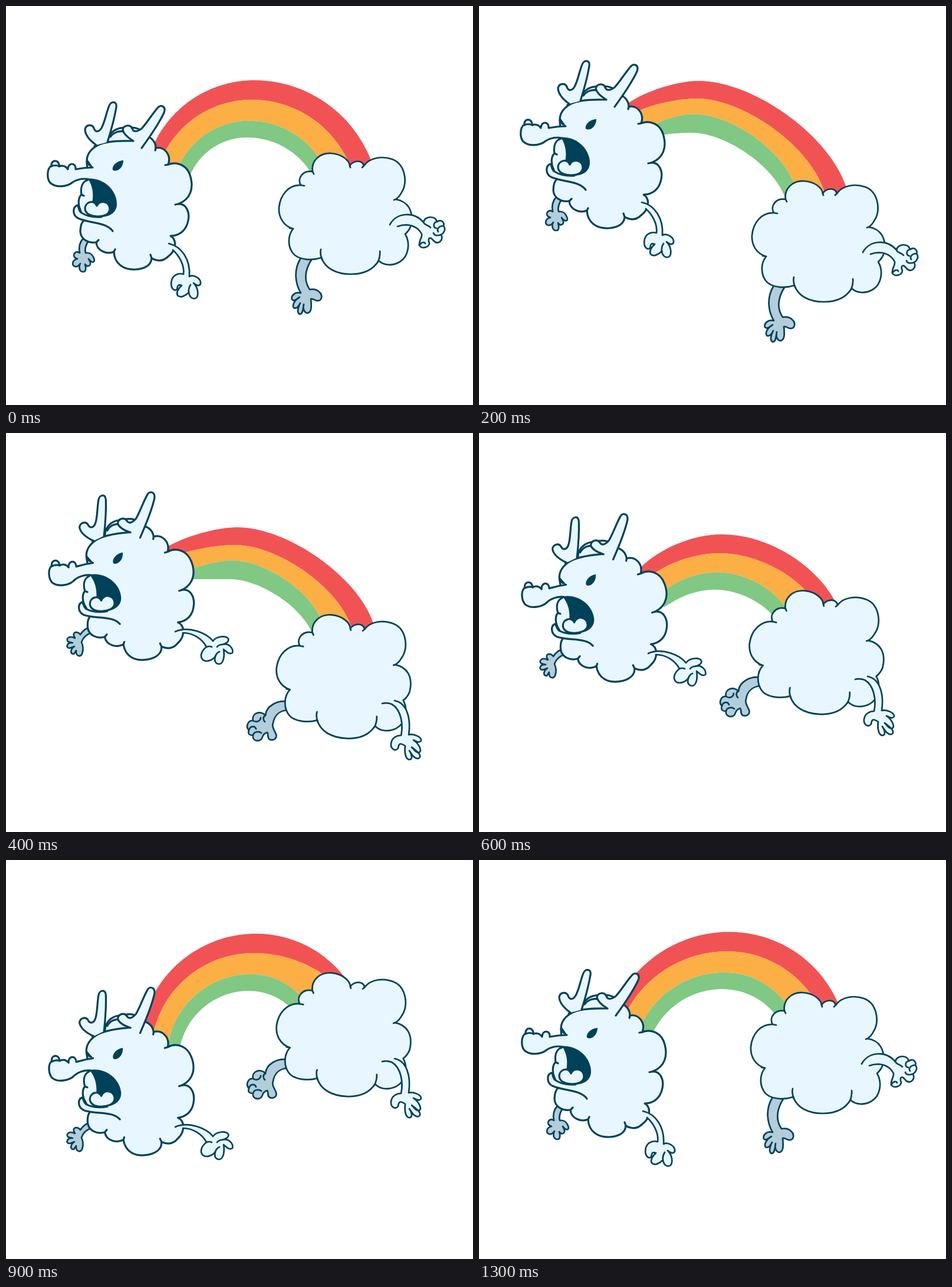
Animation of 792x677 px, one loop 1.4 s. Source, as an HTML page:

```html
<!DOCTYPE html>
<html lang="en">
<head>
<meta charset="utf-8">
<title>Rainbow cloud dragon</title>
<style>
  html, body { margin: 0; width: 100%; height: 100%; overflow: hidden; background: #fff; }
  svg { display: block; width: 100vw; height: 100vh; }
  .ink { fill: none; stroke: #00415a; stroke-width: 2.7; stroke-linecap: round; stroke-linejoin: round; }
  .thick { stroke-width: 3.2; }
  .light { fill: #e8f7ff; }
  .shade { fill: #b4cddb; }
  .dark { fill: #00415a; stroke: none; }
</style>
</head>
<body>
<svg viewBox="0 0 792 677" xmlns="http://www.w3.org/2000/svg">
  <defs>
    <g id="rearCloud">
      <path class="light" d="M500,304 C493,292 504,278 520,281 C517,263 532,249 551,250 C570,251 582,262 583,271 C590,261 604,261 607,271 C617,257 638,254 655,260 C677,268 682,300 671,316 Q667,324 661,328 C680,331 692,346 687,372 Q684,381 677,387 C686,402 683,425 668,434 C656,441 641,441 632,432 C622,449 604,455 585,455 C560,455 541,445 535,427 C517,433 495,430 487,420 C478,409 477,390 487,378 C470,373 462,358 463,342 C465,320 480,303 500,304 Z"/>
      <path d="M534,413 Q532,420 536,430 M634,416 Q635,425 631,434 M487,378 l-6,-1 M520,281 l2,4 M583,271 l1,3 M607,271 l-3,3 M661,328 l-3,1 M500,304 l6,1"/>
    </g>
    <g id="face">
      <path class="light" d="M137,265 C136,248 150,235 172,231 C174,212 190,205 205,207 C220,204 232,210 236,220 C246,222 254,230 254,241 C268,238 281,252 275,269 C290,263 308,270 313,290 C318,308 314,328 292,336 C306,335 312,350 309,364 C306,380 295,390 279,390 C290,396 289,415 275,425 Q263,437 247,428 C246,440 235,446 220,447 C200,448 184,438 183,417 C172,422 154,416 153,401 C140,403 127,396 126,383 Q126,368 133,363 L126,346 C122,338 122,325 128,320 C126,308 129,298 139,295 Z"/>
      <path d="M150,238 C163,231 185,228 215,229 M177,222 C183,213 194,211 204,214 M292,336 l-5,1 M275,269 l-5,1 M254,241 l-1,4 M247,428 l-2,-6 M183,417 l2,-4 M153,401 l4,-4 M128,320 l4,2"/>
      <path class="dark" d="M139,293 C165,291 188,312 188,336 C188,351 175,358 160,358 C147,358 145,345 146,335 C149,318 147,306 139,293 Z"/>
      <path class="light" d="M134,343 C135,332 149,328 154,339 C159,328 176,331 176,345 C175,355 165,357 155,357 C145,357 134,353 134,343 Z"/>
      <path class="light" d="M181,382 C170,366 140,369 122,360 C112,354 113,341 121,338 C124,340 122,347 128,351 C138,357 150,359 162,358"/>
      <path class="light" d="M147,274 C138,274 128,275 118,277 C119,265 105,265 105,277 C101,271 96,270 90,272 C91,260 76,260 77,271 C69,276 69,293 75,300 C85,309 104,307 113,299 C121,294 130,292 141,294"/>
      <path d="M77,272 Q83,269 91,272"/>
      <path class="dark" d="M199,262 C189,262 179,271 181,278 C186,283 199,276 199,262 Z"/>
      <path class="dark" d="M138,260 L147,273 C140,274 136,268 138,260 Z"/>
    </g>
    <path id="antlerLeft" class="light" d="M153,236 C142,228 134,218 134,209 C136,201 146,200 149,207 C151,214 157,215 162,207 C168,196 170,181 175,169 C178,161 189,161 187,172 C184,190 178,212 172,231"/>
    <path id="antlerRight" class="light" d="M216,229 C206,223 199,216 198,210 C200,201 211,201 214,208 C216,214 222,214 230,208 C240,197 248,183 257,173 C262,166 272,170 268,181 C261,196 246,219 230,241"/>
  </defs>

  <g id="rainbow"></g>

  <g id="rear">
    <g class="ink">
      <path class="shade" d="M499,429 C488,448 490,470 500,487 C490,484 483,492 485,498 C488,502 494,497 498,494 C489,499 485,508 488,512 C493,515 497,508 499,504 C495,512 493,520 498,523 C504,523 504,512 505,506 C503,514 506,521 512,521 C519,519 518,508 517,497 C522,496 524,501 530,500 C536,499 537,490 532,486 C528,481 521,480 515,481 C506,468 505,450 519,429"/>
      <use href="#rearCloud"/>
      <path class="light" d="M651,371 C662,350 692,348 708,367 C710,356 728,355 731,366 C739,361 744,368 742,373 C747,379 742,386 738,388 C742,396 735,405 727,400 L721,394 C716,392 716,398 718,402 C718,410 704,413 701,406 C700,399 706,393 705,387 C698,373 682,368 664,374"/>
      <path d="M708,367 C710,372 717,372 720,376 M731,366 C724,367 724,377 730,377 M742,373 C734,373 730,379 733,383 M738,388 C732,390 726,390 725,385 M701,406 C705,400 710,400 711,403"/>
    </g>
    <g class="ink">
      <g transform="translate(0 40)">
        <path class="shade" d="M480,357 C458,353 441,366 440,380 C432,371 416,376 419,389 C410,388 406,400 412,405 C409,413 415,414 419,414 C417,424 431,426 434,419 C436,414 437,411 443,409 C446,412 442,417 447,421 C456,424 461,417 457,410 C453,402 451,398 453,393 C455,381 463,372 478,371"/>
        <path d="M419,389 C425,393 431,390 432,384 M440,380 C435,383 436,388 439,391 M412,405 C414,398 422,397 424,403 M419,414 C420,408 428,406 433,410"/>
      </g>
      <use href="#rearCloud" transform="translate(567 352) rotate(2.7) scale(1.015) translate(-570 -350)"/>
      <path class="light" transform="translate(0 40)" d="M659,355 C680,359 687,385 683,413 C690,411 705,416 704,423 C700,428 696,424 691,422 C700,428 706,440 701,443 C695,444 692,438 688,434 C699,442 706,449 700,453 C693,455 688,446 684,440 C690,449 689,456 683,455 C676,453 676,438 677,432 C668,426 666,428 665,436 C660,442 652,437 653,428 C654,418 663,414 670,414 C674,395 670,370 654,361 Q646,358 638,360"/>
    </g>
  </g>

  <g id="head">
    <g class="ink">
      <path class="shade" d="M131,394 C124,402 123,410 125,419 C118,414 112,422 117,427 L121,429 C112,431 111,440 117,442 C121,443 124,440 126,437 C122,445 126,451 131,451 C136,451 136,444 134,438 C138,444 144,441 143,435 L140,429 C147,438 152,434 149,428 C146,420 140,418 135,419 C133,412 136,403 141,398"/>
      <g class="thick"><use href="#face"/><use href="#antlerLeft"/><use href="#antlerRight"/></g>
      <path class="light" d="M276,403 C298,408 313,430 311,459 C318,455 331,462 330,471 C328,477 321,473 318,470 C326,478 327,490 323,495 C317,499 311,494 310,486 C304,492 296,496 291,491 C288,486 293,479 298,474 C292,472 291,474 290,481 C284,485 278,477 281,465 C284,455 294,453 301,455 C303,440 294,424 283,414"/>
      <path d="M310,486 Q309,479 313,473"/>
    </g>
    <g class="ink">
      <path class="shade" transform="translate(0 -36)" d="M146,421 C136,425 129,431 126,436 C122,430 113,431 115,438 L117,442 C107,437 101,443 105,448 L113,450 C103,449 101,458 107,459 C111,459 115,456 116,456 C108,462 109,469 115,469 L119,463 C118,472 125,475 129,469 C132,460 130,453 128,449 C131,440 139,434 146,433"/>
      <g class="thick" transform="rotate(-6.3 188 271)">
        <use href="#face"/>
        <use href="#antlerLeft" transform="translate(-1 1) rotate(-5 152 235)"/>
        <use href="#antlerRight" transform="rotate(-6 222 230)"/>
      </g>
      <g transform="translate(0 -36)">
        <path class="light" d="M287,431 C310,421 340,433 351,447 C356,439 372,437 377,443 C379,449 371,452 366,453 C378,449 386,460 384,467 C378,471 373,464 369,461 C371,472 369,485 362,486 C354,486 353,479 355,473 C350,480 338,484 333,478 C328,471 333,462 340,457 C332,442 316,433 300,433"/>
        <path d="M355,473 Q357,467 362,465 M366,453 Q361,453 358,457 M340,457 Q345,455 349,457"/>
      </g>
    </g>
  </g>
</svg>
<script>
const STEP = 100, STEPS = 14;
const mix = (a, b, k) => a + (b - a) * k;

// looping straight-line motion through [step, value] keys
function track(...keys) {
  keys.push([STEPS, keys[0][1]]);
  return i => {
    const n = keys.findIndex(key => key[0] > i);
    const [t0, a] = keys[n - 1], [t1, b] = keys[n];
    return mix(a, b, (i - t0) / (t1 - t0));
  };
}

const headY = track([0, 0], [2, -70], [3, -101], [4, -58], [6, -21], [8, 36], [10, 80], [11, 63], [13, 23]);
const rearY = track([0, 0], [2, 47], [3, 82], [4, 59], [6, 18], [8, -40], [10, -76], [11, -58], [13, -25]);
const crestX = track([0, 421], [2, 372], [6, 412], [11, 432]);
const crestY = track([0, 126], [2, 127], [3, 107], [4, 160], [6, 172], [8, 136], [10, 114], [11, 126], [13, 122]);
// how far the rainbow's feet slide along the two clouds
const leftSlide = track([0, 0], [2, 3], [4, 21], [6, 20], [8, -15], [11, -27], [13, -17]);
const rightSlide = track([0, 0], [2, 4], [4, 3], [8, -37], [11, -36]);

// rainbow edges from outer to inner: feet at rest, and the slope the right foot slides on
const EDGES = [
  { left: [253, 230], right: [618, 259], slope: -.2 },
  { left: [272, 243], right: [580, 263], slope: .2 },
  { left: [295, 268], right: [530, 257], slope: -.7 },
  { left: [313, 285], right: [514, 278], slope: -.7 }
];

// circular shoulder from a foot up to the crest, as Bezier handles
function shoulder(foot, top, tension) {
  const dx = top[0] - foot[0], dy = foot[1] - top[1];
  const phi = 2 * Math.atan(dy / Math.abs(dx));
  const q = Math.tan(phi / 4) ** 2;
  const reach = dx * (1 + q) ** 2 / (3 * (1 - q)) * tension;
  const ux = Math.sign(dx) * Math.cos(phi), uy = -Math.sin(phi);
  return {
    tail: [foot[0] - ux * 22, foot[1] - uy * 22],
    low: [foot[0] + ux * Math.abs(reach), foot[1] + uy * Math.abs(reach)],
    high: [top[0] - reach, top[1]]
  };
}

// a rainbow pulled askew gets thinner and straighter
function rainbowEdges(i) {
  const pull = Math.min(1, Math.max(0, (rearY(i) - headY(i)) / 110));
  const depths = [0, .34, mix(.71, .64, pull), 1];
  const s = leftSlide(i), r = rightSlide(i);
  return EDGES.map(({ left, right, slope }, n) => {
    const top = [crestX(i) - 12 * depths[n], crestY(i) + mix(97, 88, pull) * depths[n]];
    const a = [left[0] + s, left[1] + s + headY(i)];
    const b = [right[0] + r, right[1] + r * slope + rearY(i)];
    const up = shoulder(a, top, 1 - .18 * pull), down = shoulder(b, top, 1 - .18 * pull);
    return [up.tail, a, up.low, up.high, top, down.high, down.low, b, down.tail];
  });
}

const trace = p => `${p[0]} L${p[1]} C${p.slice(2, 5).join(' ')} C${p.slice(5, 8).join(' ')} L${p[8]}`;

const rainbow = document.getElementById('rainbow');
const bands = ['#f15355', '#fcaf45', '#80c883'].map(color => {
  const band = document.createElementNS('http://www.w3.org/2000/svg', 'path');
  band.setAttribute('fill', color);
  return rainbow.appendChild(band);
});
const head = document.getElementById('head'), rear = document.getElementById('rear');

function place(part, x, y, pose) {
  part.setAttribute('transform', `translate(${x} ${y})`);
  [...part.children].forEach((g, n) => g.style.display = n === pose ? '' : 'none');
}

function draw(time) {
  const i = Math.floor(time / STEP) % STEPS;
  const pose = i >= 4 && i <= 10 ? 1 : 0;
  const nudge = i > 10 ? 2 : 0;
  place(head, nudge, headY(i), pose);
  place(rear, -nudge, rearY(i), pose);
  const edges = rainbowEdges(i);
  bands.forEach((band, n) => {
    band.setAttribute('d', `M${trace(edges[n])} L${trace(edges[n + 1].reverse())} Z`);
    edges[n + 1].reverse();
  });
}

function tick() {
  draw(performance.now());
  requestAnimationFrame(tick);
}
tick();
</script>
</body>
</html>
```
